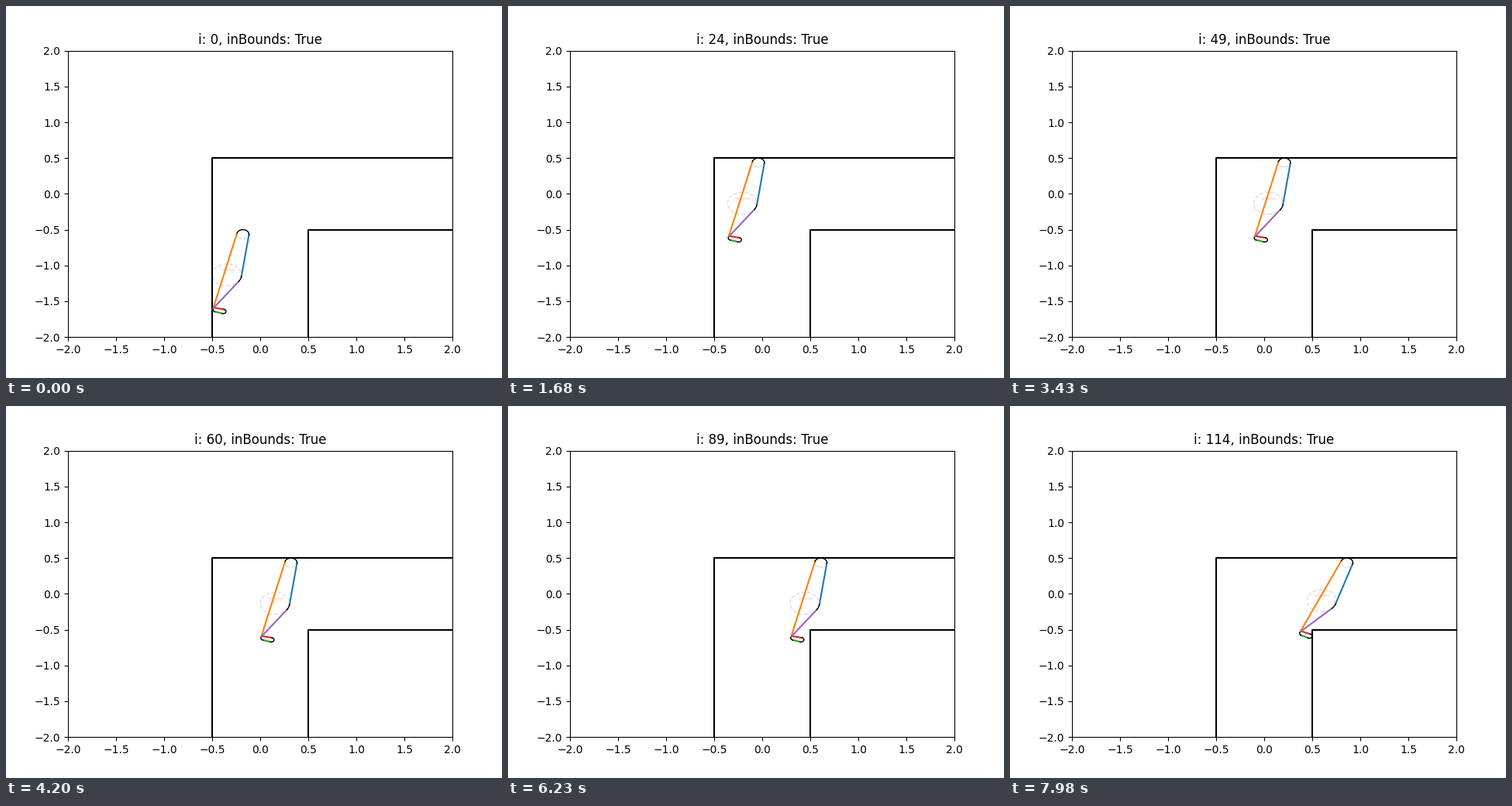
Animation of 640x480 px, one loop 8 s. Source, as a matplotlib script:

```python
import numpy as np
import matplotlib.pyplot as plt
from matplotlib.animation import FuncAnimation
from matplotlib.patches import Circle

STEP_MS, TICK_MS, LOOP_MS = 70, 40, 8000

# Corner circles of the sofa: centre and radius
TOP = np.array([-0.18, -0.563]), 0.063
BIG = np.array([-0.347, -1.132]), 0.153
LEFT = np.array([-0.463, -1.617]), 0.03
RIGHT = np.array([-0.3855, -1.642]), 0.03
NOTCH = np.array([-0.482, -1.589]), 0.0
CIRCLES = [TOP, BIG, LEFT, RIGHT]
PIVOT = TOP[0]


def tangent(a, b, side):
    """Outer tangent of two circles: its end points and its unit normal."""
    (ca, ra), (cb, rb) = a, b
    d = cb - ca
    length = np.hypot(*d)
    u = d / length
    p = side * np.array([-u[1], u[0]])
    k = (ra - rb) / length
    n = k * u + np.sqrt(1 - k * k) * p
    return np.array([ca + ra * n, cb + rb * n]), n


def arc(circle, n0, n1):
    """Counterclockwise arc between two normals."""
    c, r = circle
    a0, a1 = (np.arctan2(n[1], n[0]) for n in (n0, n1))
    t = a0 + np.linspace(0, 1, 40) * ((a1 - a0) % (2 * np.pi))
    return c + r * np.column_stack([np.cos(t), np.sin(t)])


blue, n_blue = tangent(TOP, BIG, 1)
orange, n_orange = tangent(TOP, LEFT, -1)
green, n_green = tangent(LEFT, RIGHT, -1)
red, n_red = tangent(LEFT, RIGHT, 1)
purple, n_purple = tangent(NOTCH, BIG, -1)
red[0] = NOTCH[0]

edges = [blue, orange, green, red, purple]
arcs = [
    arc(TOP, n_blue, n_orange),
    arc(LEFT, n_orange, n_green),
    arc(RIGHT, n_green, n_red),
    arc(BIG, n_purple, n_blue),
]

fig, ax = plt.subplots(figsize=(6.4, 4.8), dpi=100)
ax.set_xlim(-2, 2)
ax.set_ylim(-2, 2)
ax.plot([-0.5, -0.5, 2], [-2, 0.5, 0.5], color="black")
ax.plot([0.5, 0.5, 2], [-2, -0.5, -0.5], color="black")

rings = [
    ax.add_patch(Circle(c, r, fill=False, ls="--", lw=1, ec="black", alpha=0.14))
    for c, r in CIRCLES
]
mark, = ax.plot([], [], color="#fde8e2", lw=2.2, solid_capstyle="butt")
edge_lines = [ax.plot([], [], color=f"C{k}")[0] for k in range(len(edges))]
arc_lines = [ax.plot([], [], color="black", lw=1)[0] for _ in arcs]
title = ax.set_title("")


def pose(i):
    """Go up the corridor, slide right, then turn against the inner wall."""
    shift = np.array([0.01 * max(i - 10, 0), 0.1 * min(i, 10)])
    c, r = RIGHT
    v = c - PIVOT
    length = np.hypot(*v)
    dx = min(v[0], 0.5 - r - (PIVOT[0] + shift[0]))
    turn = np.arcsin(dx / length) - np.arcsin(v[0] / length)
    cos, sin = np.cos(turn), np.sin(turn)
    rot = np.array([[cos, -sin], [sin, cos]])
    return lambda pts: (pts - PIVOT) @ rot.T + PIVOT + shift


def draw(tick):
    i = (tick * TICK_MS + 30) // STEP_MS
    move = pose(i)
    for line, pts in zip(edge_lines + arc_lines, edges + arcs):
        line.set_data(*move(pts).T)
    for ring, (c, _) in zip(rings, CIRCLES):
        ring.center = move(c)
    x, y = move(BIG[0])
    mark.set_data([x - 0.075, x + 0.08], [y + 0.076] * 2)
    title.set_text(f"i: {i}, inBounds: True")
    return edge_lines + arc_lines + rings + [mark, title]


anim = FuncAnimation(fig, draw, frames=LOOP_MS // TICK_MS, interval=TICK_MS,
                     repeat=True, repeat_delay=0, blit=False)
plt.show()
```
